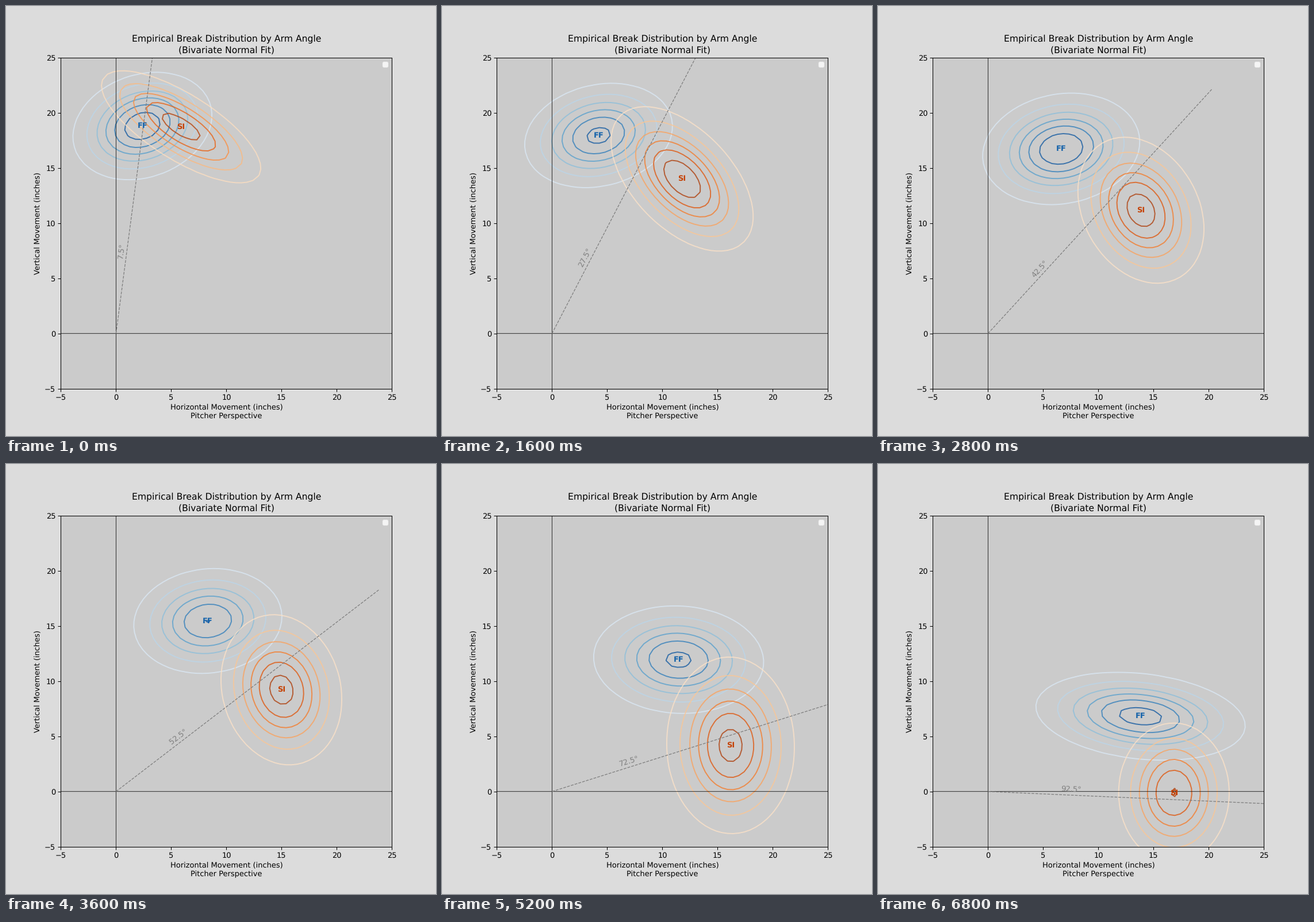
Recreate the animation shown at these times as a matplotlib script. Size 748 by 748 pixels, loop 7.2 s.

```python
import numpy as np
import matplotlib.pyplot as plt
from matplotlib.animation import FuncAnimation

plt.rcParams["text.hinting"] = "no_hinting"

FRAMES, INTERVAL = 18, 400
ARM_LENGTH = 30

GRID = np.linspace(-25, 25, 100)
X, Y = np.meshgrid(GRID, GRID)

# Key poses (mean x, mean y, sigma x, sigma y) at these steps, eased between.
KEYS = np.array([0, 2, 5, 9, 13, 15, 17])
FF = np.array([
    (2.39, 18.80, 3.21, 2.48), (2.92, 18.33, 3.15, 2.27), (5.00, 17.66, 3.64, 2.56),
    (8.32, 15.45, 3.537, 2.50), (11.47, 11.95, 4.02, 2.536), (10.93, 10.34, 4.00, 2.51),
    (13.82, 6.82, 4.90, 2.05)])
SI = np.array([
    (5.90, 18.73, 3.90, 2.74), (9.90, 16.15, 3.60, 3.24), (12.44, 13.02, 3.14, 3.34),
    (14.99, 9.22, 2.83, 3.52), (16.18, 4.18, 3.00, 4.15), (16.93, 1.42, 2.71, 3.70),
    (16.84, -0.12, 2.635, 3.328)])


def ff_tilt(u):
    return 0.2 - 0.42 * u**2


def si_tilt(u):
    return -0.74 * np.exp(-(u / 0.4)**2)


def ease(poses, i):
    """Cubic Hermite interpolation through the key poses."""
    slopes = np.gradient(poses, KEYS, axis=0, edge_order=2)
    k = min(np.searchsorted(KEYS, i, side="right"), len(KEYS) - 1) - 1
    h = KEYS[k + 1] - KEYS[k]
    s = (i - KEYS[k]) / h
    w = s * s * (3 - 2 * s)
    return ((1 - w) * poses[k] + w * poses[k + 1]
            + h * s * (1 - s) * ((1 - s) * slopes[k] - s * slopes[k + 1]))


def density(mx, my, sx, sy, rho):
    u, v = (X - mx) / sx, (Y - my) / sy
    k = 1 - rho**2
    norm = 2 * np.pi * sx * sy * np.sqrt(k)
    return np.exp(-(u**2 - 2 * rho * u * v + v**2) / (2 * k)) / norm


fig, ax = plt.subplots(figsize=(8, 8), dpi=93.5, facecolor="#dcdcdc")
ax.set_facecolor("#cbcbcb")
ax.set(xlim=(-5, 25), ylim=(-5, 25), aspect="equal")
ax.set_xticks(range(-5, 26, 5))
ax.set_yticks(range(-5, 26, 5))
ax.set_title("Empirical Break Distribution by Arm Angle\n(Bivariate Normal Fit)",
             linespacing=1.37)
ax.set_xlabel("Horizontal Movement (inches)\nPitcher Perspective")
ax.set_ylabel("Vertical Movement (inches)")
for zero_line in (ax.axhline, ax.axvline):
    zero_line(0, color="black", lw=0.6, snap=False, zorder=2.1)
ax.legend([], [], loc="upper right")

arm, = ax.plot([], [], "--", color="gray", lw=1, zorder=2.2)
arm_label = ax.text(0, 0, "", color="gray", ha="center", va="center")


def pitch_label(name, cmap):
    return ax.text(0, 0, name, color=cmap(0.8), weight="bold",
                   ha="center", va="center", zorder=4)


pitches = [
    (FF, ff_tilt, plt.cm.Blues, pitch_label("FF", plt.cm.Blues)),
    (SI, si_tilt, plt.cm.Oranges, pitch_label("SI", plt.cm.Oranges)),
]
contours = []


def update(i):
    while contours:
        contours.pop().remove()
    for poses, tilt, cmap, label in pitches:
        pose = ease(poses, i)
        z = density(*pose, tilt(i / (FRAMES - 1)))
        contours.append(ax.contour(X, Y, z, levels=6, cmap=cmap, alpha=0.75))
        label.set_position(pose[:2])

    angle = 7.5 + 5 * i
    s, c = np.sin(np.radians(angle)), np.cos(np.radians(angle))
    arm.set_data([0, ARM_LENGTH * s], [0, ARM_LENGTH * c])
    arm_label.set_position((7.5 * s - 0.5 * c, 7.5 * c + 0.5 * s))
    arm_label.set_rotation(90 - angle)
    arm_label.set_text(f"{angle:.1f}°")
    return []


anim = FuncAnimation(fig, update, frames=FRAMES, init_func=lambda: [],
                     interval=INTERVAL, repeat=True, repeat_delay=0)
plt.show()
```
